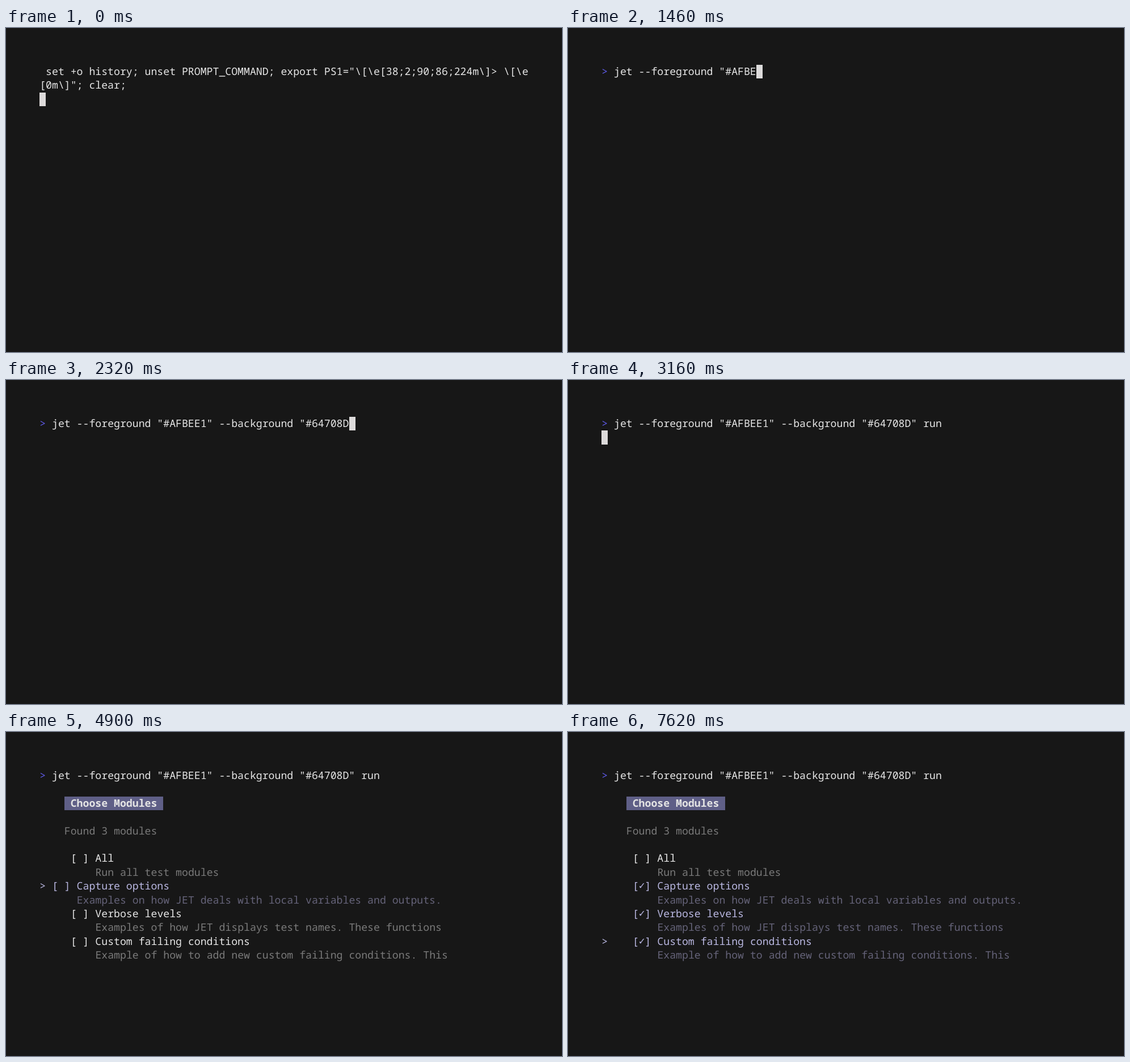
An HTML page that plays this animation: 980x572 px, repeating every 8000 ms.

```html
<!DOCTYPE html>
<html lang="en">
<head>
<meta charset="utf-8">
<title>Terminal module picker</title>
<style>
  html, body { margin: 0; width: 100%; height: 100%; overflow: hidden; background: #171717; }
  #term {
    --cw: 10.91px;
    --rh: 24.4px;
    position: absolute; left: 59.2px; top: 65.1px;
    font: 500 18.183px/24.4px "Noto Sans Mono", "DejaVu Sans Mono", monospace;
    font-variant-ligatures: none;
    text-rendering: geometricPrecision;
    color: #e6e6e6;
  }
  #term span {
    position: absolute; white-space: pre;
    left: calc(var(--col) * var(--cw));
    top: calc(var(--row) * var(--rh));
    height: var(--rh);
  }
  #term .prompt { color: #5f5bea; }
  #term .title { background: #5f5f87; color: #e4e4e4; font-weight: 700; }
  #term .muted { color: #7a7a7a; }
  #term .accent { color: #bab8e2; }
  #term .dim { color: #656379; }
  #term .check {
    color: #bab8e2; width: var(--cw); text-align: center;
    font-family: "DejaVu Sans Mono", monospace; font-size: 18px;
  }
  #term .cursor { width: var(--cw); background: #dddbdb; }
</style>
</head>
<body>
<div id="term"></div>
<script>
const LOOP = 8000;
const term = document.getElementById('term');

const SETUP = [
  ' set +o history; unset PROMPT_COMMAND; export PS1="\\[\\e[38;2;90;86;224m\\]> \\[\\e',
  '[0m\\]"; clear;'
];
const COMMAND = 'jet --foreground "#AFBEE1" --background "#64708D" run';

// Typing bursts: first key, last key, time of each
const BURSTS = [
  { from: 1, to: 18, start: 622.5, end: 1260 },
  { from: 19, to: 42, start: 1320, end: 2120 },
  { from: 43, to: 53, start: 2140, end: 2500 }
];

const ITEMS = [
  { name: 'All', note: 'Run all test modules' },
  { name: 'Capture options', note: 'Examples on how JET deals with local variables and outputs.', focus: 4900, check: 5440 },
  { name: 'Verbose levels', note: 'Examples of how JET displays test names. These functions', focus: 5980, check: 6540 },
  { name: 'Custom failing conditions', note: 'Example of how to add new custom failing conditions. This', focus: 7080, check: 7620 }
];

function typedCount(t) {
  let count = 0;
  for (const { from, to, start, end } of BURSTS) {
    const gap = (end - start) / (to - from);
    for (let n = from; n <= to; n++) {
      const at = Math.floor((start + (n - from) * gap + 5) / 20) * 20;
      if (t >= at) count = n;
    }
  }
  return count;
}

const cell = (row, col, text, cls = '') => ({ row, col, text, cls });
const cursor = (row, col) => cell(row, col, '', 'cursor');

function setupScreen(t) {
  return [...SETUP.map((line, row) => cell(row, 0, line)), cursor(t < 80 ? 2 : 6, 0)];
}

function commandLine(t) {
  const n = typedCount(t);
  const out = [cell(0, 0, '>', 'prompt'), cell(0, 2, COMMAND.slice(0, n))];
  const blinkedOff = (t >= 480 && n === 0) || (t >= 2860 && t < 3160);
  if (t >= 3160) {
    if (t < 3300) out.push(cursor(1, 0));
  } else if (!blinkedOff) {
    out.push(cursor(0, 2 + n));
  }
  return out;
}

function menuItem(item, i, focused, checked) {
  const row = 6 + i * 2;
  const col = focused && !checked ? 2 : 5;
  const lit = focused || checked;
  const out = [
    cell(row, col, '[ ] ' + item.name, lit ? 'accent' : ''),
    cell(row + 1, col + 4, item.note, lit ? 'dim' : 'muted')
  ];
  if (focused) out.push(cell(row, 0, '>', 'accent'));
  if (checked) out.push(cell(row, col + 1, '✓', 'check'));
  return out;
}

function menu(t) {
  const out = [];
  if (t >= 3320) out.push(cell(2, 4, ' Choose Modules ', 'title'));
  if (t >= 3340) out.push(cell(4, 4, 'Found 3 modules', 'muted'));
  if (t >= 3360) {
    const active = ITEMS.filter(item => t >= item.focus).length;
    ITEMS.forEach((item, i) => out.push(...menuItem(item, i, i === active, t >= item.check)));
  }
  return out;
}

function screen(t) {
  return t < 100 ? setupScreen(t) : [...commandLine(t), ...menu(t)];
}

function toSpan({ row, col, text, cls }) {
  const span = document.createElement('span');
  span.className = cls;
  span.textContent = text;
  span.style.setProperty('--row', row);
  span.style.setProperty('--col', col);
  return span;
}

let shown = '';
function draw() {
  const cells = screen(performance.now() % LOOP);
  const key = JSON.stringify(cells);
  if (key !== shown) {
    shown = key;
    term.replaceChildren(...cells.map(toSpan));
  }
  requestAnimationFrame(draw);
}
draw();
</script>
</body>
</html>
```
